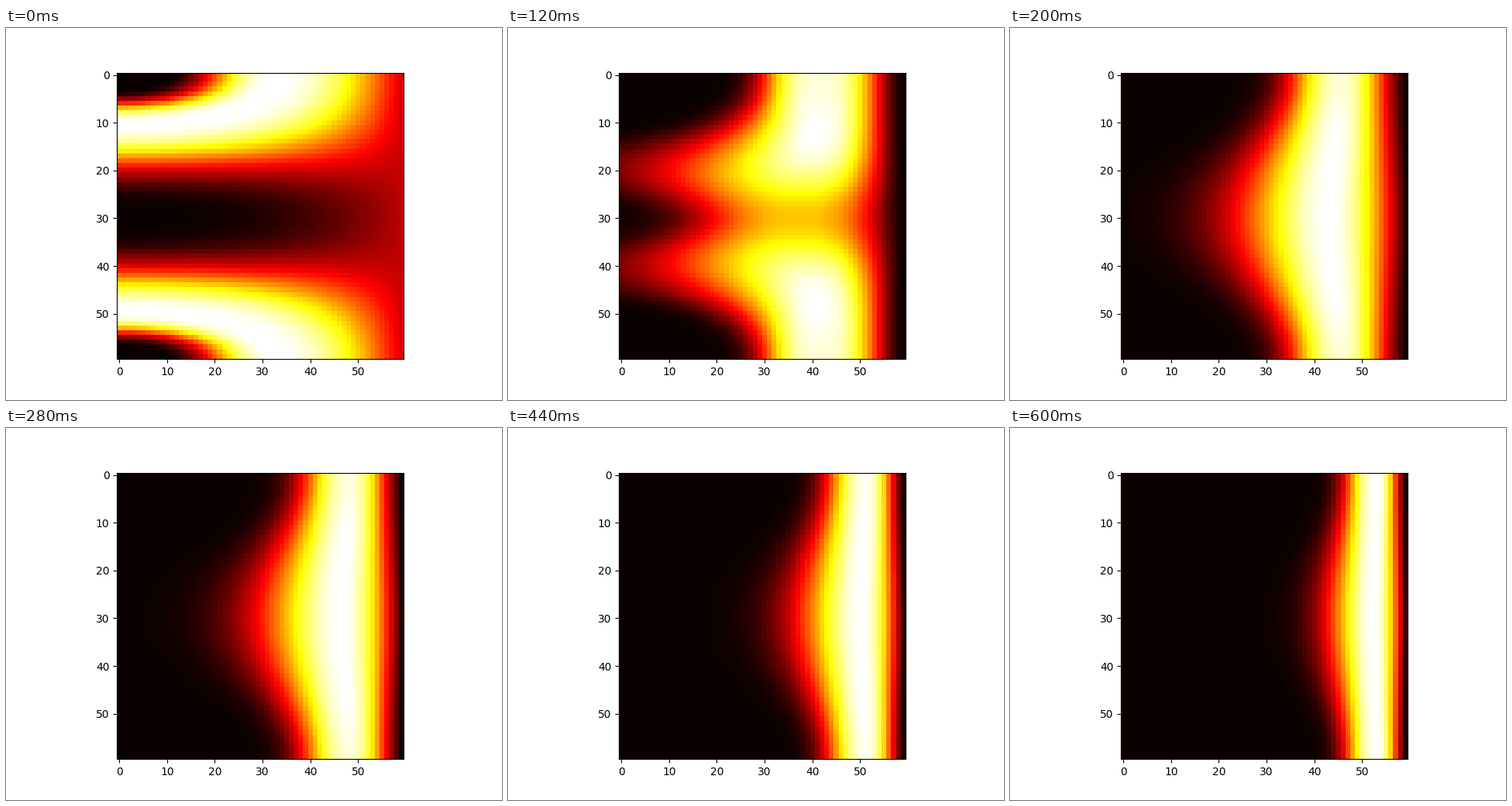
Write a matplotlib script that moves like this. It is 640 px wide and 480 px high and loops after 620 ms.

```python
import numpy as np
import matplotlib.pyplot as plt
from matplotlib.animation import FuncAnimation

SIZE, FRAMES, INTERVAL = 60, 31, 20
WALL = SIZE - 0.8
BLEND_END = 6
FLOOR = 0.003

y, x = np.mgrid[0:SIZE, 0:SIZE].astype(float)
theta = 2 * np.pi * y / SIZE
wave = np.cos(theta)
outer = (1 + wave) / 2      # 1 at the top and bottom edges
inner = 1 - outer           # 1 on the middle row


def opening():
    """Bright ring around the corners, fading to the middle and the wall."""
    phase = -0.55 + np.cos(np.pi * x / (2 * SIZE)) * (0.55 + wave)
    crest = 0.45
    rise = np.clip((phase + 1) / (crest + 1), 0, 1)
    drop = np.clip((phase - crest) / 0.49, 0, 1)
    return (np.sin(np.pi / 2 * rise) ** 1.7
            * np.cos(np.pi / 2 * drop ** 1.5) ** 1.5)


def ridge(n):
    """Bright ridge that narrows as it is pressed against the wall."""
    early = np.clip((10 - n) / 4, 0, 1)
    side = np.sin(theta) ** 2

    gap = outer * 213 / (n + 6) + inner * 235 / (n + 4.6)
    width = (outer * (13.5 - 0.22 * n) + inner * (24.5 - 0.49 * n)
             + 24 * early * side * inner ** 2)
    power = 2 + 0.5 * outer ** 2 + early * (0.6 - 1.1 * side)
    fall = 1.1 + 0.2 * wave + 0.6 * early
    height = (1 - 0.07 * (1 - n / 30) * outer ** 4
              - 0.35 * early * inner ** 4)

    offset = x - (WALL - gap)
    left = np.clip(-offset, 0, None) / width
    right = np.clip(offset / gap, 0, 1) ** (1 + 0.5 * early)
    return height * np.exp(-left ** power) * np.cos(np.pi / 2 * right) ** fall


def field(n):
    if n < BLEND_END:
        # The opening pattern decays exponentially into the ridge.
        k = n / BLEND_END
        f = ((opening() + FLOOR) ** (1 - k)
             * (ridge(BLEND_END) + FLOOR) ** k)
    else:
        f = ridge(n)
    return (f - f.min()) / (f.max() - f.min())


fig, ax = plt.subplots(figsize=(6.4, 4.8), dpi=100)
image = ax.imshow(field(0), cmap="hot", vmin=0, vmax=1)


def update(n):
    image.set_data(field(n))
    return [image]


anim = FuncAnimation(fig, update, frames=FRAMES, interval=INTERVAL,
                     repeat=True, repeat_delay=0)
plt.show()
```
